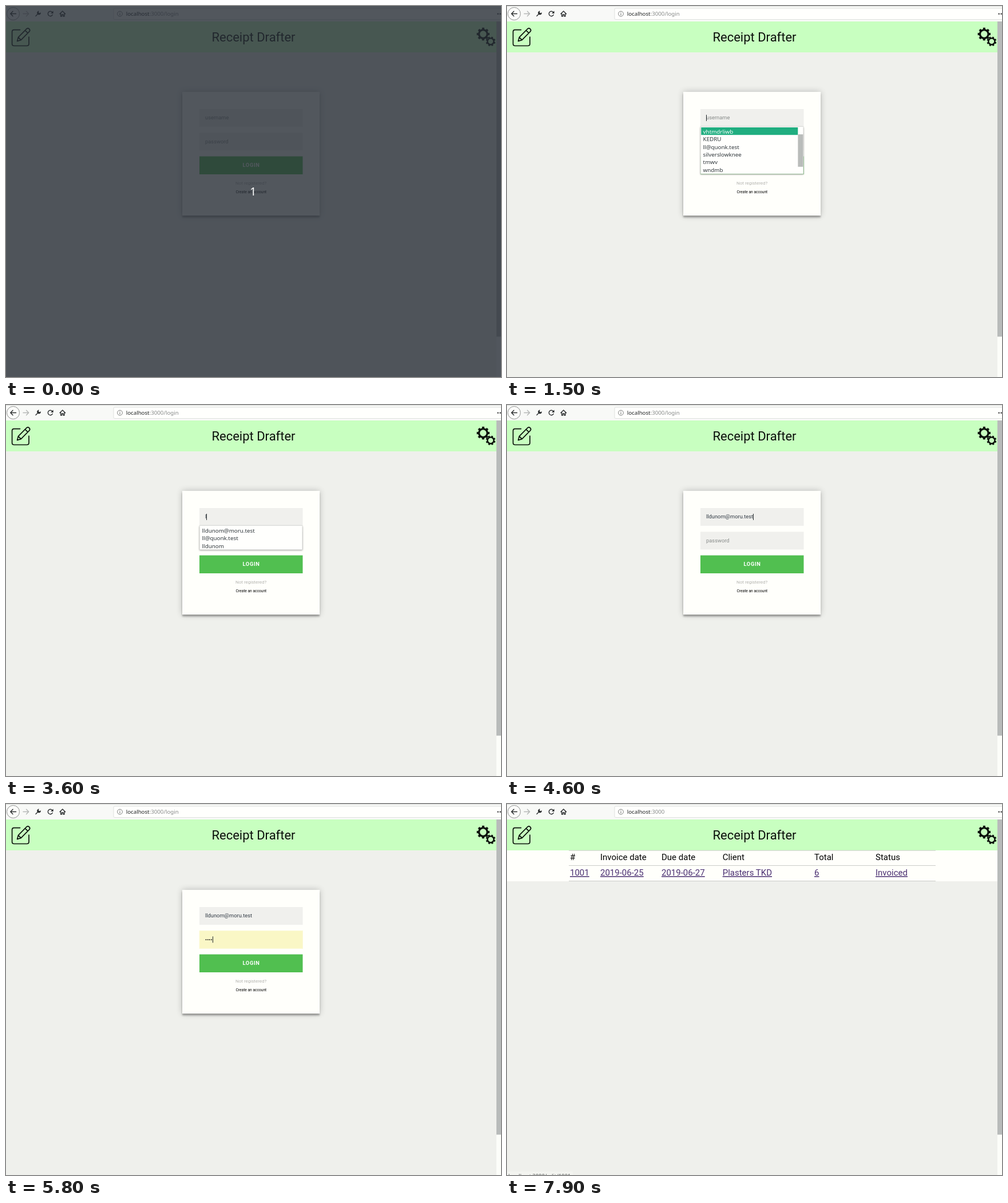
Write an HTML page that moves like this. It is 865x648 px and loops after 8 s.

```html
<!DOCTYPE html>
<html lang="en">
<head>
<meta charset="utf-8">
<title>Login demo</title>
<style>
  html, body { margin: 0; width: 100%; height: 100%; overflow: hidden; background: #eff0ec; }
  svg { display: block; width: 100%; height: 100%; }
  text { font-family: Roboto, sans-serif; white-space: pre; }
  .ui { font-family: "Noto Sans", sans-serif; }
  .line { fill: none; stroke: #2a2d2e; stroke-width: 1.4; stroke-linecap: round; stroke-linejoin: round; }
  .field { font-size: 9.33px; fill: #333c46; }
  .hint { font-size: 9.33px; fill: #888c8a; }
  .row { font-size: 9.8px; fill: #30373c; }
  .cell { font-size: 15px; }
  .link { fill: #4a2f72; text-decoration: underline; text-decoration-thickness: 1px; }
  .mid { text-anchor: middle; }
</style>
</head>
<body>
<svg id="stage" viewBox="0 0 865 648" xmlns="http://www.w3.org/2000/svg">
  <defs>
    <filter id="wide" x="-20%" y="-20%" width="140%" height="140%"><feGaussianBlur stdDeviation="6"/></filter>
    <filter id="tight" x="-20%" y="-20%" width="140%" height="140%"><feGaussianBlur stdDeviation="1.7"/></filter>
  </defs>

  <rect width="865" height="648" fill="#eff0ec"/>

  <!-- browser bar -->
  <rect width="865" height="27" fill="#f8f9f7"/>
  <rect width="865" height="1" fill="#dcdddb"/>
  <rect x="188" y="4" width="690" height="19.5" rx="2" fill="#fffffd" stroke="#d9dad8" stroke-width=".8"/>
  <circle cx="12.5" cy="13.5" r="11" fill="#fcfcfa" stroke="#8f9190" stroke-width="1"/>
  <path class="line" d="M17.5 13.5H8M12 9.3L7.8 13.5L12 17.7"/>
  <path class="line" style="stroke:#b5b7b6" d="M30 13.5H39.5M35.5 9.3L39.7 13.5L35.5 17.7"/>
  <path class="line" stroke-width="2" d="M52 17.5L57 12.5"/>
  <path d="M60.8 11.2A3.4 3.4 0 1 1 57.6 8.6L56.9 11.2L58.4 12.5Z" fill="#2a2d2e"/>
  <path class="line" d="M81.3 15.3A4.2 4.2 0 1 1 80.6 10.6"/>
  <path d="M82.6 8.6V13H78.2Z" fill="#2a2d2e"/>
  <path class="line" d="M94 13.8L98.8 9L103.6 13.8M95.6 13.4V18H97.6V15H100V18H102V13.4"/>
  <circle cx="199" cy="13.6" r="4.4" fill="none" stroke="#6d706f" stroke-width=".9"/>
  <path d="M199 13V16M199 11V12" stroke="#6d706f" stroke-width="1.1"/>
  <text class="ui" x="209.7" y="17.2" font-size="9.7" fill="#1f2223">localhost<tspan fill="#878a89">:3000<tspan id="path">/login</tspan></tspan></text>
  <circle cx="859.7" cy="13.7" r="1.3" fill="#444"/><circle cx="863.7" cy="13.7" r="1.3" fill="#444"/>

  <!-- page header -->
  <rect y="27" width="857" height="54" fill="#c8ffc0"/>
  <text class="mid" x="432.5" y="61.7" font-size="22" fill="#0b0f0b">Receipt Drafter</text>
  <g fill="none" stroke="#0b100b" stroke-width="1.7" stroke-linejoin="round" stroke-linecap="round">
    <path d="M24.5 41.6H14Q10.6 41.6 10.6 45V66Q10.6 69.5 14 69.5H36.5Q40 69.5 40 66V54"/>
    <path d="M19.6 61.4L21.4 54.6L36 39.9Q38.3 37.8 40.6 40.1Q42.8 42.4 40.7 44.6L26.2 59.4ZM33.4 42.6L38 47.2M21.4 54.6L26.2 59.4"/>
  </g>
  <g id="gears" fill="none" stroke="#0b100b"></g>

  <!-- page scrollbar -->
  <rect x="857" y="27" width="8" height="621" fill="#fcfdf9"/>
  <rect x="857" y="27" width="8" height="550.5" fill="#b8bbba"/>

  <g id="login">
    <rect x="308" y="150" width="240" height="216" opacity=".22" filter="url(#wide)"/>
    <rect x="308" y="153.3" width="240" height="216" opacity=".3" filter="url(#tight)"/>
    <rect x="308" y="150" width="240.3" height="216" fill="#fffffb"/>
    <rect x="338" y="180" width="180.5" height="31" fill="#f0f0ed"/>
    <rect id="passBox" x="338" y="221.4" width="180.5" height="31" fill="#f0f0ed"/>
    <rect x="338" y="262.6" width="180.5" height="31.4" fill="#51bf50"/>
    <text class="mid" x="428.5" y="281.2" font-size="9.33" font-weight="700" letter-spacing=".65" fill="#fff">LOGIN</text>
    <text class="mid" x="428.2" y="312" font-size="8" fill="#b3b3b0">Not registered?</text>
    <text class="mid" x="428.4" y="327.2" font-size="6.65" fill="#000">Create an account</text>
    <text id="userHint" class="hint" x="348" y="198.4">username</text>
    <text id="passHint" class="hint" x="348" y="239.8">password</text>
    <text id="user" class="field" x="348" y="198.4"></text>
    <text id="pass" class="field" x="348" y="239.8" style="fill:#111"></text>
    <rect id="caret" width="1" height="11" fill="#22282c"/>
    <g id="menus"></g>
  </g>

  <g id="table">
    <rect id="sheet" y="81" width="857" fill="#fffffb"/>
    <g id="head"></g>
    <g id="entry"></g>
  </g>

  <g id="status">
    <rect y="642" width="115" height="6" fill="#f3f4f0"/>
    <text class="ui" x="2.5" y="653.2" font-size="9.4" fill="#5d605f">localhost:3000/edit/1001</text>
  </g>

  <g id="dim">
    <rect width="865" height="648" fill="#272d36" opacity=".8"/>
    <text class="ui mid" x="431.8" y="331" font-size="19.5" fill="#fff">1</text>
  </g>
</svg>

<script>
const LOOP = 8000, ROW = 13.4;
const $ = id => document.getElementById(id);
const show = (el, on) => el.style.display = on ? "" : "none";

const MAIL = "lldunom@moru.test";
const SAVED = ["vhtmdrliwb", "KEDRU", "ll@quonk.test", "silverslowknee", "tmwv", "wndmb"];

function gear(x, y, r, turn) {
  const ring = (k, w, extra) =>
    `<circle cx="${x}" cy="${y}" r="${r * k}" stroke-width="${r * w}" ${extra}/>`;
  return ring(.66, .3, "") +
    ring(.86, .28, `pathLength="80" stroke-dasharray="5 5" transform="rotate(${turn} ${x} ${y})"`);
}
$("gears").innerHTML = gear(833.8, 49, 11.2, -11) + gear(846.9, 61.8, 8.5, 10);

// Autocomplete list; pick() highlights one row, or none with -1.
function menu(y, names, height, scrolls) {
  const g = document.createElementNS("http://www.w3.org/2000/svg", "g");
  const barWidth = scrolls ? 169 : 178.5;
  g.innerHTML =
    `<rect x="338" y="${y + 1}" width="180" height="${height}" opacity=".4" filter="url(#tight)"/>
     <rect x="338.3" y="${y}" width="179.6" height="${height}" fill="#fffffd" stroke="#cfd1cf" stroke-width=".5"/>
     <rect class="bar" x="339.3" width="${barWidth}" height="13.2" fill="#20ae80"/>` +
    (scrolls ? `<rect x="508.4" y="${y + 13.4}" width="9" height="56.6" fill="#b9bcba"/>` : "") +
    names.map((n, i) => `<text class="ui row" x="342.6" y="${y + 11.9 + i * ROW}">${n}</text>`).join("");
  $("menus").append(g);
  const bar = g.querySelector(".bar"), rows = g.querySelectorAll(".row");
  return {
    el: g,
    pick(n) {
      show(bar, n >= 0);
      bar.setAttribute("y", y + 1.2 + n * ROW);
      rows.forEach((r, i) => r.style.fill = i === n ? "#fff" : "");
    }
  };
}
const allMenu = menu(210.8, SAVED, 82.4, true);
const matchMenu = menu(210.8, [MAIL, SAVED[2], "lldunom"], 42, false);
const passMenu = menu(252.6, [MAIL, ...SAVED], 96, false);

const COLS = [110, 163, 270, 376.7, 537, 644];
const cells = (y, cls, words) =>
  words.map((w, i) => `<text class="cell ${cls}" x="${COLS[i]}" y="${y}">${w}</text>`).join("");
const rule = y => `<rect x="108" y="${y}" width="641" height="1" fill="#cbccc9"/>`;
$("head").innerHTML = rule(80.7) + rule(107) +
  cells(97.8, "", ["#", "Invoice date", "Due date", "Client", "Total", "Status"]);
$("entry").innerHTML = rule(134) +
  cells(125, "link", ["1001", "2019-06-25", "2019-06-27", "Plasters TKD", "6", "Invoiced"]);

// Last value whose start time has passed.
const at = (t, steps) => steps.reduce((v, [start, next]) => t >= start ? next : v, steps[0][1]);

const USER = [[0, ""], [3600, "l"], [3800, "ll"], [4600, MAIL]];
const CARET = [[0, 0], [700, 1], [1800, 0], [3000, 1], [4300, 0], [4600, 1], [6100, 0]];
const ALL = [[0, 0], [1100, .5], [1200, 1], [3600, 0]];
const MATCH = [[0, 0], [3600, 1], [4600, 0]];
const PASS = [[0, 0], [5000, .5], [5100, 1], [5800, 0]];

function setMenu(m, opacity, row) {
  show(m.el, opacity > 0);
  m.el.setAttribute("opacity", opacity);
  m.pick(row);
}

function render(t) {
  const home = t >= 6500, loaded = t >= 6600;
  const inPass = t >= 4900, filled = t >= 5800;
  show($("dim"), t < 100);
  show($("login"), !home);
  show($("table"), home);
  show($("entry"), loaded);
  show($("status"), t >= 7900);
  $("sheet").setAttribute("height", loaded ? 54 : 27);
  $("path").textContent = home ? "" : "/login";
  if (home) return;

  const name = at(t, USER);
  $("user").textContent = name;
  $("pass").textContent = filled ? "••••" : "";
  show($("userHint"), !name);
  show($("passHint"), !filled);
  $("passBox").setAttribute("fill", filled ? "#faf7c6" : "#f0f0ed");
  $("passBox").setAttribute("stroke", filled ? "#fbf9d8" : "none");

  const active = $(inPass ? "pass" : "user");
  const width = active.textContent ? active.getComputedTextLength() : 0;
  $("caret").setAttribute("x", 348 + Math.round(width));
  $("caret").setAttribute("y", inPass ? 231.3 : 190);
  show($("caret"), at(t, CARET));

  setMenu(allMenu, at(t, ALL), at(t, [[0, -1], [1500, 0], [2000, 1], [2100, 2]]));
  setMenu(matchMenu, at(t, MATCH), at(t, [[0, -1], [4200, 0]]));
  setMenu(passMenu, at(t, PASS), at(t, [[0, -1], [5200, 0]]));
}

const begin = performance.now();
function tick() {
  render((performance.now() - begin) % LOOP);
  requestAnimationFrame(tick);
}
tick();
</script>
</body>
</html>
```
